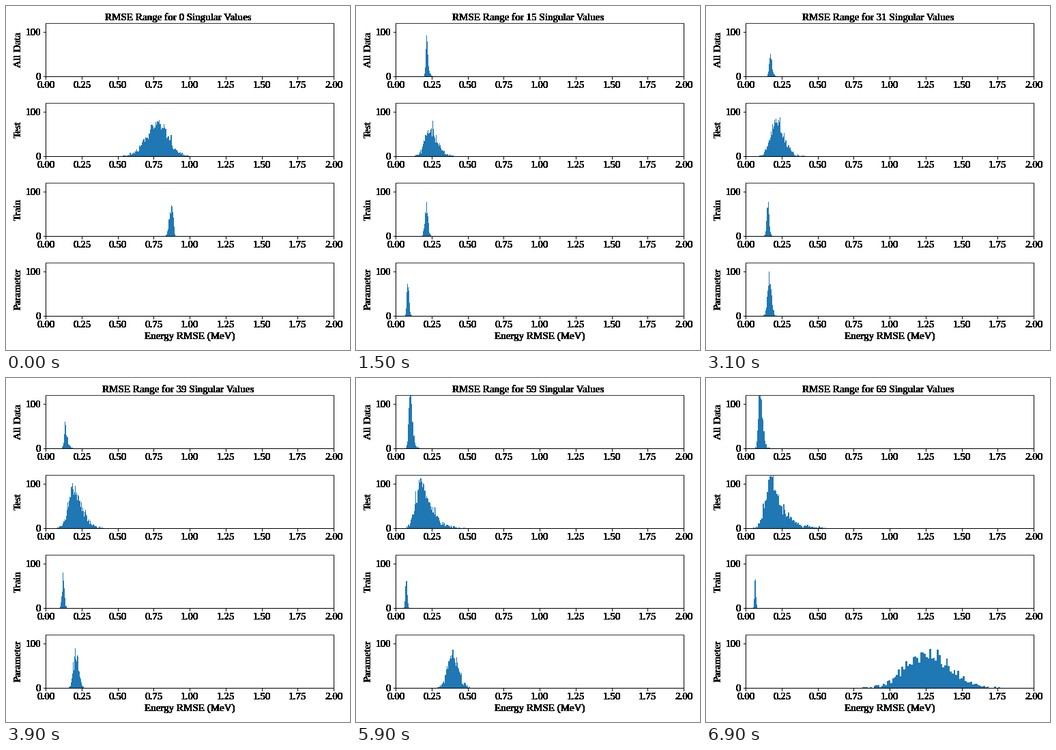
A matplotlib script that plays this animation: 504 px wide and 504 px high, repeating every 7 s.

```python
import numpy as np
import matplotlib.pyplot as plt
from matplotlib.animation import FuncAnimation

FRAMES = 70
SIZE = 504
LEFT, RIGHT = .1157, .9524
PIXEL = 2 / (SIZE * (RIGHT - LEFT))  # data width of one screen pixel
MAX_BINS = 75

plt.rcParams.update({"font.family": "Liberation Serif", "font.size": 15,
                     "axes.labelsize": 15, "figure.titlesize": 15,
                     "axes.linewidth": 1})


def sigmoid(x):
    return 1 / (1 + np.exp(-x))


def rise(n):
    """Growth of the low-error peak over the first values."""
    return min(n / 5, 1)


def fade(n):
    """Disappearance of the high-error peak."""
    return np.clip((8 - n) / 4, 0, 1)


# Each panel gives peaks as (mode, left width, right width, tail power, height).

def all_data(n):
    step = sigmoid((36 - n) / 6)
    width = .005 + .00008 * n
    height = 80 + n - 280 * step * (1 - step)
    return [(.87 - .083 * n, .014 + .01 * n, .014 + .006 * n, 3,
             66 * min(n, 1) * fade(n)),
            (.1 + .1 * step + .165 * np.exp(-n / 7),
             width, 1.2 * width, 1.4, height * rise(n))]


def test(n):
    step = sigmoid((38 - n) / 5)
    return [(.785 - .056 * n, .08 - .006 * n, .066, 2,
             (75 - 3 * n) * fade(n)),
            (.178 + .04 * step + .2 * np.exp(-n / 7),
             .037, .047, 2 - .012 * n, (45 + 1.1 * n) * rise(n))]


def train(n):
    step = sigmoid((34 - n) / 10)
    width = .012 - .0001 * n
    return [(.874 - .082 * n, .014 + .011 * n, .014 + .006 * n, 3,
             65 * fade(n)),
            (.062 + .16 * step + .125 * np.exp(-n / 7),
             width, width, 2, 70 * rise(n))]


def parameter(n):
    mode = .024 + .0037 * n + 2.6e-5 * n ** 2 + .837 * np.exp((n - 69) / 3.84)
    width = .07 * mode + .03 * mode ** 2
    return [(mode, width, 1.25 * width, 2, 75 * rise(n))]


PANELS = {"All Data": all_data, "Test": test,
          "Train": train, "Parameter": parameter}


def profile(x, peaks):
    total = np.zeros_like(x)
    for mode, low, high, power, height in peaks:
        d = np.abs(x - mode)
        shape = np.where(x < mode, (d / low) ** 2, (d / high) ** power)
        total += height * np.exp(-shape / 2)
    return total


def histogram(peaks, seed):
    grid = np.arange(0, 2, PIXEL) + PIXEL / 2
    used = grid[profile(grid, peaks) > .4]
    if not len(used):
        return [0], [0, 1]
    start, stop = used[0] - PIXEL / 2, used[-1] + PIXEL / 2
    width = max(PIXEL, (stop - start) / MAX_BINS)
    edges = start + width * np.arange(int(np.ceil((stop - start) / width)) + 1)
    means = profile(edges[:-1] + width / 2, peaks)
    return np.random.default_rng(seed).poisson(means), edges


def harden(img, dpi):
    """Turn every inked pixel solid black, for hard-edged lettering."""
    solid = np.zeros_like(img)
    solid[..., 3] = img[..., 3] > .05
    return solid, 0, 0


def setup(ax, name):
    ax.set(xlim=(0, 2), ylim=(0, 120), ylabel=name,
           xticks=np.linspace(0, 2, 9), yticks=[0, 100])
    ax.spines["top"].set_color("#333333")
    for axis in (ax.xaxis, ax.yaxis):
        axis.set_agg_filter(harden)
    return ax.stairs([0], [0, 1], fill=True, color="#1f77b4",
                     antialiased=False)


fig, axes = plt.subplots(
    4, 1, figsize=(7, 7), dpi=72, facecolor="white",
    gridspec_kw=dict(left=LEFT, right=RIGHT, bottom=.1, top=.95, hspace=.5))
bars = [setup(ax, name) for ax, name in zip(axes, PANELS)]
axes[-1].set_xlabel("Energy RMSE (MeV)")
title = fig.suptitle("")
title.set_agg_filter(harden)


def update(n):
    title.set_text(f"RMSE Range for {n} Singular Values")
    for i, (bar, peaks) in enumerate(zip(bars, PANELS.values())):
        bar.set_data(*histogram(peaks(n), 10 * n + i))
    return [title, *bars]


anim = FuncAnimation(fig, update, frames=FRAMES, interval=100,
                     repeat=True, repeat_delay=0, blit=False)
plt.show()
```
